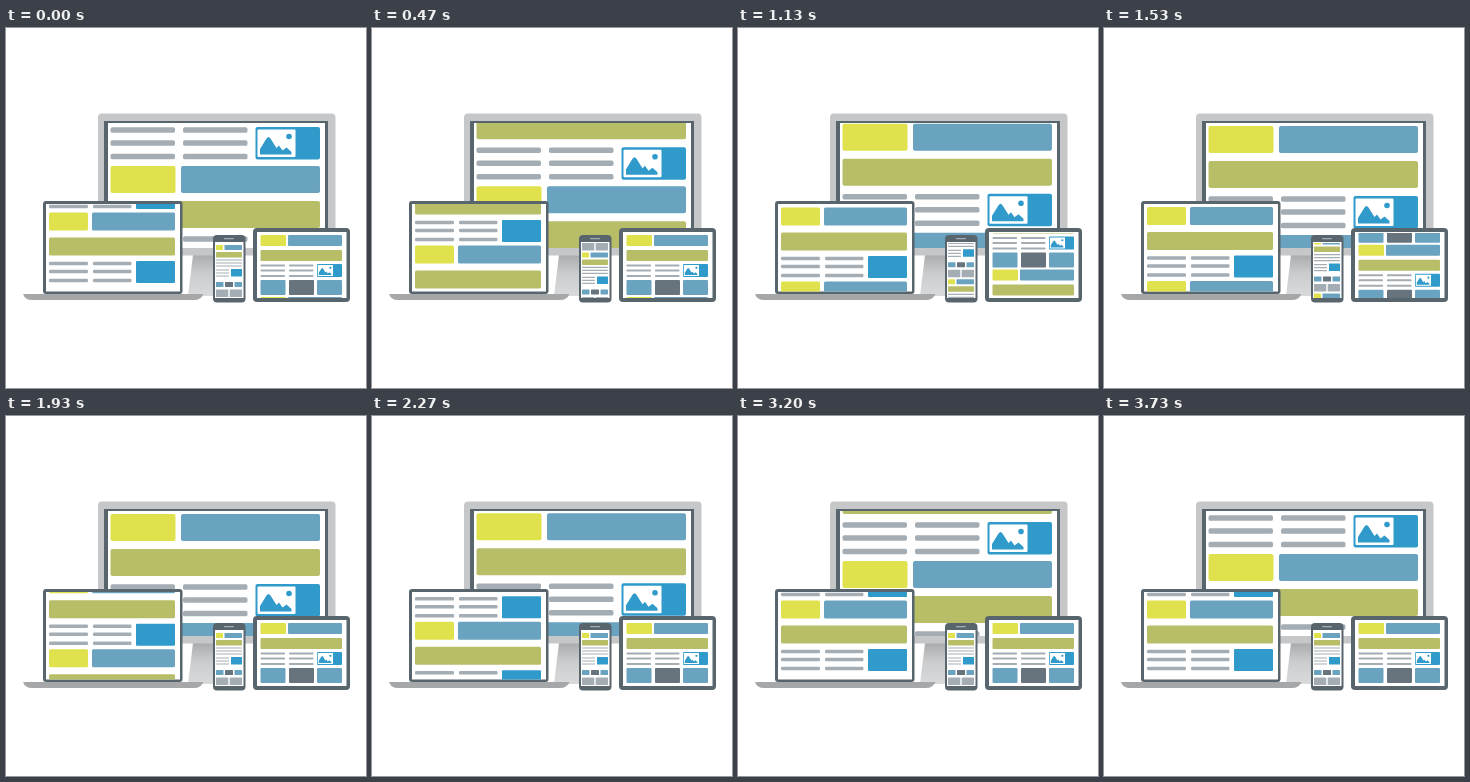
Write an HTML page that moves like this. It is 360 px wide and 360 px high and loops after 4070 ms.

```html
<!DOCTYPE html>
<html lang="en">
<head>
<meta charset="utf-8">
<title>Responsive screens</title>
<style>
  html, body { margin: 0; width: 100%; height: 100%; overflow: hidden; background: #fff; }
  #stage { display: block; width: 100vw; height: 100vh; }
  .yellow { fill: #dfe24d; }
  .blue { fill: #69a3bf; }
  .olive { fill: #b8bd68; }
  .vivid { fill: #309bcb; }
  .slate { fill: #68747d; }
  .line { fill: #a4adb4; }
  .frame { fill: #58656d; }
  .white { fill: #fff; }
</style>
</head>
<body>
<svg id="stage" viewBox="0 0 360 360">
  <defs>
    <linearGradient id="neck" x1="0" y1="0" x2="0" y2="1">
      <stop offset="0" stop-color="#a9abad"/>
      <stop offset=".45" stop-color="#cbccce"/>
      <stop offset="1" stop-color="#d9dadb"/>
    </linearGradient>
    <g id="photo">
      <rect class="white" x="2" y="2.5" width="38" height="27.5" rx="1"/>
      <path class="vivid" d="M4.500 27.500V22L11 11.500Q13 8.500 15 11.500L21 21L23.500 18.500L27 23.500L31 20.500L36 25V27.500Z"/>
      <circle class="vivid" cx="33.500" cy="9.500" r="2.800"/>
    </g>
    <clipPath id="clip-monitor"><rect x="102" y="95" width="217" height="125"/></clipPath>
    <clipPath id="clip-laptop"><rect x="40" y="176" width="134" height="87.500"/></clipPath>
    <clipPath id="clip-tablet"><rect x="251" y="205" width="89.500" height="65"/></clipPath>
    <clipPath id="clip-phone"><rect x="209" y="215" width="28.500" height="55"/></clipPath>
  </defs>

  <!-- monitor -->
  <path fill="url(#neck)" d="M187 227H235L239 268H182Z"/>
  <rect fill="#c6c7c9" x="92" y="85.500" width="237.500" height="142" rx="4"/>
  <rect class="frame" x="98" y="93" width="224" height="127"/>
  <rect class="white" x="102" y="95" width="217" height="125"/>
  <g clip-path="url(#clip-monitor)"><g id="monitor"></g></g>

  <!-- laptop -->
  <path fill="#a6a7a9" d="M17 266H197.500Q195 272 188 272H26Q19 272 17 266Z"/>
  <rect class="frame" x="37" y="173" width="139.500" height="93" rx="3"/>
  <rect class="white" x="40" y="176" width="134" height="87.500"/>
  <g clip-path="url(#clip-laptop)"><g id="laptop"></g></g>

  <!-- tablet -->
  <rect class="frame" x="247" y="200" width="97" height="74" rx="4"/>
  <rect class="white" x="251" y="204" width="89.500" height="66"/>
  <g clip-path="url(#clip-tablet)"><g id="tablet"></g></g>

  <!-- phone -->
  <rect class="frame" x="207" y="207" width="32.500" height="67.500" rx="4"/>
  <rect fill="#a4adb4" x="218" y="210" width="10" height="1.200" rx=".6"/>
  <rect class="white" x="209" y="214" width="28.500" height="56"/>
  <g clip-path="url(#clip-phone)"><g id="phone"></g></g>
</svg>
<script>
  const STEP = 1000 / 15, LAST = 56, LOOP = 4070;
  const $ = id => document.getElementById(id);

  const box = (kind, x, y, w, h, r = 1) =>
    `<rect class="${kind}" x="${x}" y="${y}" width="${w}" height="${h}" rx="${r}"/>`;
  const lines = (x, w, h, ys) => ys.map(y => box('line', x, y - h / 2, w, h, h / 3)).join('');
  const photo = (x, y, scale) => `<use href="#photo" transform="translate(${x} ${y}) scale(${scale})"/>`;

  // Every page holds the same block twice, one below the other.
  function fill(id, height, block) {
    $(id).innerHTML = `<g>${block}</g><g transform="translate(0 ${height})">${block}</g>`;
  }

  fill('monitor', 109,
    box('yellow', 104.5, 98, 65, 27, 2) + box('blue', 175, 98, 139, 27, 2) +
    box('olive', 104.5, 133, 209.5, 27, 2) +
    lines(104.5, 64.5, 5.5, [171, 184, 197.5]) + lines(177, 64.5, 5.5, [171, 184, 197.5]) +
    box('vivid', 249.5, 168, 64.5, 32.5, 2) + photo(249.5, 168, 1));

  fill('laptop', 74,
    box('yellow', 43, 179.5, 39, 18, 1.5) + box('blue', 86, 179.5, 83, 18, 1.5) +
    box('olive', 43, 204.5, 126, 18, 1.5) +
    lines(43, 39, 3.6, [230.5, 238.5, 247.5]) + lines(87, 38.5, 3.6, [230.5, 238.5, 247.5]) +
    box('vivid', 130, 228, 39, 22));

  fill('tablet', 62,
    box('yellow', 254.5, 207, 25.5, 11) + box('blue', 282, 207, 54, 11) +
    box('olive', 254.5, 222, 81.5, 11) +
    lines(254.5, 24.5, 2, [237.5, 242.5, 248]) + lines(283, 24.5, 2, [237.5, 242.5, 248]) +
    box('vivid', 311, 236, 25, 13) + photo(311, 236, .4) +
    box('blue', 254.5, 252, 25, 15) + box('slate', 283, 252, 25, 15) + box('blue', 311, 252, 25, 15));

  fill('phone', 54,
    box('yellow', 210, 217, 7, 5, .6) + box('blue', 218.5, 217, 17.5, 5, .6) +
    box('olive', 210, 224, 26, 5.5, .6) +
    lines(210, 26, 1.2, [232, 235, 238]) + lines(210, 13, 1.2, [242, 245, 248]) +
    box('vivid', 225, 241, 11, 7.5, .6) +
    box('blue', 210, 254, 7.5, 5, .6) + box('slate', 219, 254, 8, 5, .6) + box('blue', 228.5, 254, 7.5, 5, .6) +
    box('line', 210, 261.5, 12.3, 7.5, .6) + box('line', 223.7, 261.5, 12.3, 7.5, .6));

  // Eased progress from 0 to 1 over a span of time.
  function ease(t, start, length) {
    const p = Math.min(1, Math.max(0, (t - start) / length));
    return (1 - Math.cos(Math.PI * p)) / 2;
  }

  const scroll = {
    monitor: t => 69 * (1 - ease(t, 0, 1280) + ease(t, 2184, 1280)),
    laptop: t => 69 * (1 - ease(t, 0, 960) + ease(t, 1467, 1280)),
    tablet: t => 62 * ease(t, 458, 1454),
    phone: t => 54 * (1 - ease(t, 0, 1930))
  };

  function draw(now) {
    const step = Math.min(LAST, Math.floor((now % LOOP + 4) / STEP));
    for (const id in scroll) {
      $(id).setAttribute('transform', `translate(0 ${-scroll[id](step * STEP).toFixed(2)})`);
    }
  }

  const begin = performance.now();
  function tick() {
    draw(performance.now() - begin);
    requestAnimationFrame(tick);
  }
  tick();
</script>
</body>
</html>
```
